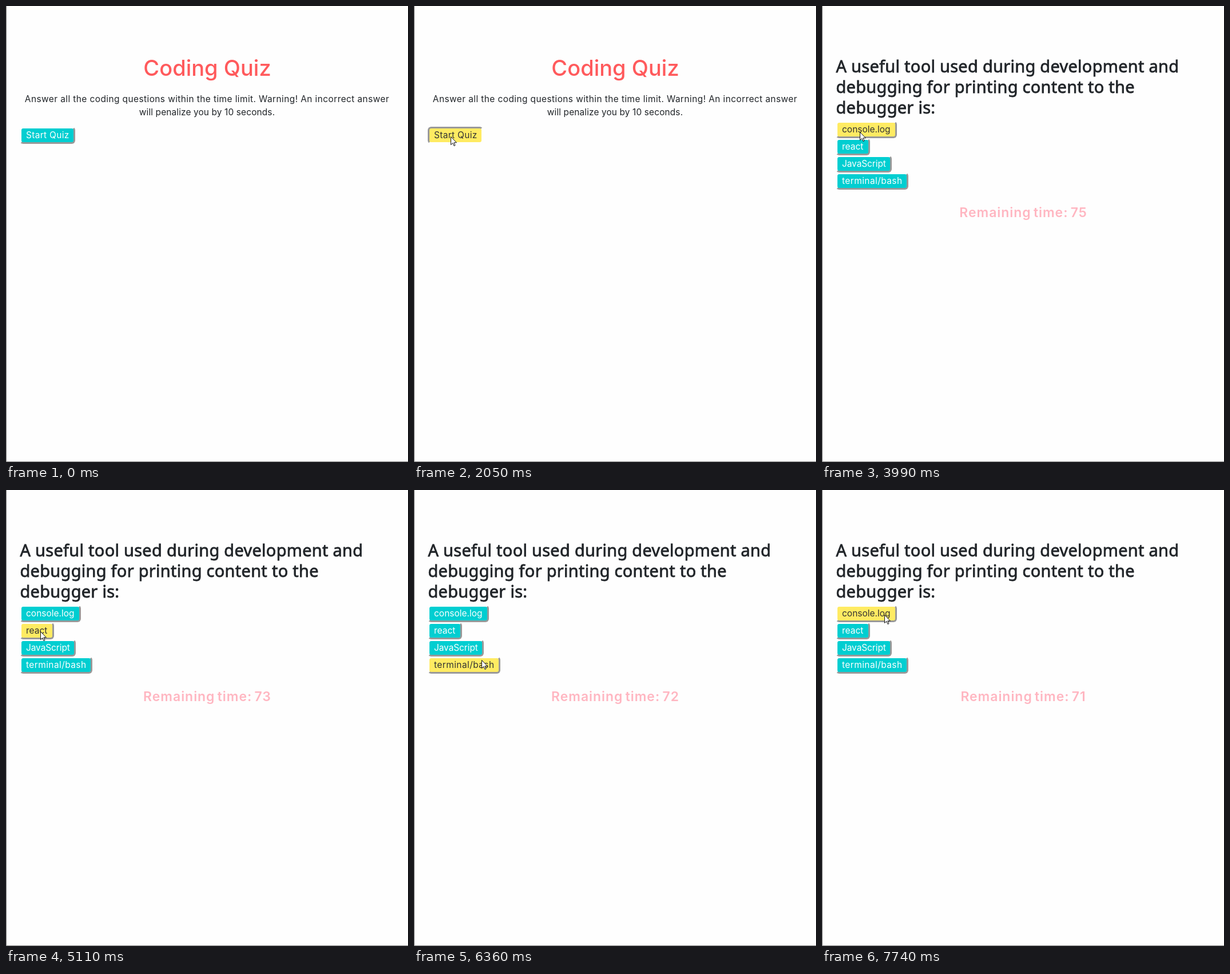
Write an HTML page that moves like this. It is 703 px wide and 797 px high and loops after 8000 ms.

```html
<!DOCTYPE html>
<html lang="en">
<head>
<meta charset="utf-8">
<title>Coding Quiz</title>
<style>
  html, body { margin: 0; width: 100%; height: 100%; overflow: hidden; background: #fefefe; }
  body { position: relative; font-family: Inter, "Open Sans", sans-serif; font-optical-sizing: none; }
  svg { position: absolute; left: 0; top: 0; overflow: visible; }
  #frame { position: absolute; inset: 0; border: solid #7d7d7d; border-width: 0 0 1px 1px; }

  .title { font-size: 38px; font-weight: 500; fill: #ff5a5c; }
  .intro { font-size: 15.5px; fill: #212529; }
  .question {
    font: 29px "Noto Sans", "Open Sans", sans-serif; letter-spacing: .27px;
    fill: #212529; stroke: #212529; stroke-width: .8px;
  }
  .timer {
    font-size: 23px; font-weight: 600; letter-spacing: .95px; word-spacing: -2.5px;
    fill: #ffb6c1;
  }
  .mid { text-anchor: middle; }

  .list { position: absolute; left: 24px; }
  .btn {
    box-sizing: border-box; height: 30px; padding-left: 8px;
    border: 3px solid; border-color: #fefefe #999 #999 #fefefe;
    border-radius: 6px; background: #00ced1; color: #fff;
    font-size: 15.5px; line-height: 24px; white-space: nowrap;
  }
  .btn.hover { background: #ffeb62; color: #333; }
  .btn.down { border-color: #999 #fefefe #fefefe #999; }
  [hidden] { display: none; }
</style>
</head>
<body>
<div id="frame"></div>

<div id="start">
  <svg width="703" height="797">
    <text class="title mid" x="352" y="122">Coding Quiz</text>
    <g class="intro mid">
      <text x="351.5" y="168" letter-spacing=".385">Answer all the coding questions within the time limit. Warning! An incorrect answer</text>
      <text x="351.5" y="190.5" letter-spacing=".09">will penalize you by 10 seconds.</text>
    </g>
  </svg>
  <div class="list" style="top:211px">
    <div class="btn" style="width:96.5px;letter-spacing:.3px">Start Quiz</div>
  </div>
</div>

<div id="quiz" hidden>
  <svg width="703" height="797">
    <g class="question">
      <text x="24.5" y="116">A useful tool used during development and</text>
      <text x="24.5" y="152">debugging for printing content to the</text>
      <text x="24.5" y="188">debugger is:</text>
    </g>
    <text id="timer" class="timer mid" x="352" y="369"></text>
  </svg>
  <div class="list" style="top:201px">
    <div class="btn" style="width:106.5px">console.log</div>
    <div class="btn" style="width:59.5px">react</div>
    <div class="btn" style="width:98px;letter-spacing:-.1px">JavaScript</div>
    <div class="btn" style="width:127px;letter-spacing:.4px">terminal/bash</div>
  </div>
</div>

<svg id="cursor" width="12" height="18">
  <path d="M.5 .5V14.6L3.8 11.5 6 16.5 8 15.6 5.9 10.8H10.4Z" fill="#fff" stroke="#111"/>
</svg>

<script>
  const LOOP = 8000, STEP = 138, LEAD = 24; // the screen refreshes once per STEP
  const PRESS = 15, OPEN = 16;              // in steps
  const CLOCK = 3060, SECONDS = 75;         // countdown start in ms, first value

  const $ = id => document.getElementById(id);
  const buttons = [...document.querySelectorAll('.btn')];

  // pointer stops: step, x, y
  const stops = [
    [2, -20, 299], [3, -7, 299], [7, 35, 284], [9, 63, 240], [11, 64, 228],
    [23, 64, 228], [29, 66, 220], [31, 66, 220], [34, 60, 247], [38, 60, 247],
    [39, 64, 272], [43, 92, 281], [45, 98, 286], [47, 137, 307],
    [53, 136, 304], [54, 117, 260.6], [56, 109, 218]
  ];

  function pointer(n) {
    const i = stops.findIndex(s => s[0] >= n);
    if (i < 1) return stops.at(i).slice(1);
    const [a, ax, ay] = stops[i - 1], [b, bx, by] = stops[i];
    const k = (n - a) / (b - a);
    return [ax + (bx - ax) * k, ay + (by - ay) * k].map(Math.round);
  }

  function inside(el, x, y) {
    const r = el.getBoundingClientRect();
    return x >= r.left && x < r.right && y >= r.top && y < r.bottom;
  }

  function draw(t) {
    const n = Math.floor((t + LEAD) / STEP);
    const [x, y] = pointer(n);
    const run = n * STEP - CLOCK;
    $('start').hidden = n >= OPEN;
    $('quiz').hidden = n < OPEN;
    buttons.forEach(b => b.classList.toggle('hover', inside(b, x, y)));
    buttons[0].classList.toggle('down', n >= PRESS);
    $('timer').textContent = run < 0 ? '' : 'Remaining time: ' + (SECONDS - Math.floor(run / 1000));
    $('cursor').style.transform = `translate(${x}px, ${y}px)`;
  }

  const begin = performance.now();
  function tick() {
    draw((performance.now() - begin) % LOOP);
    requestAnimationFrame(tick);
  }
  tick();
</script>
</body>
</html>
```
